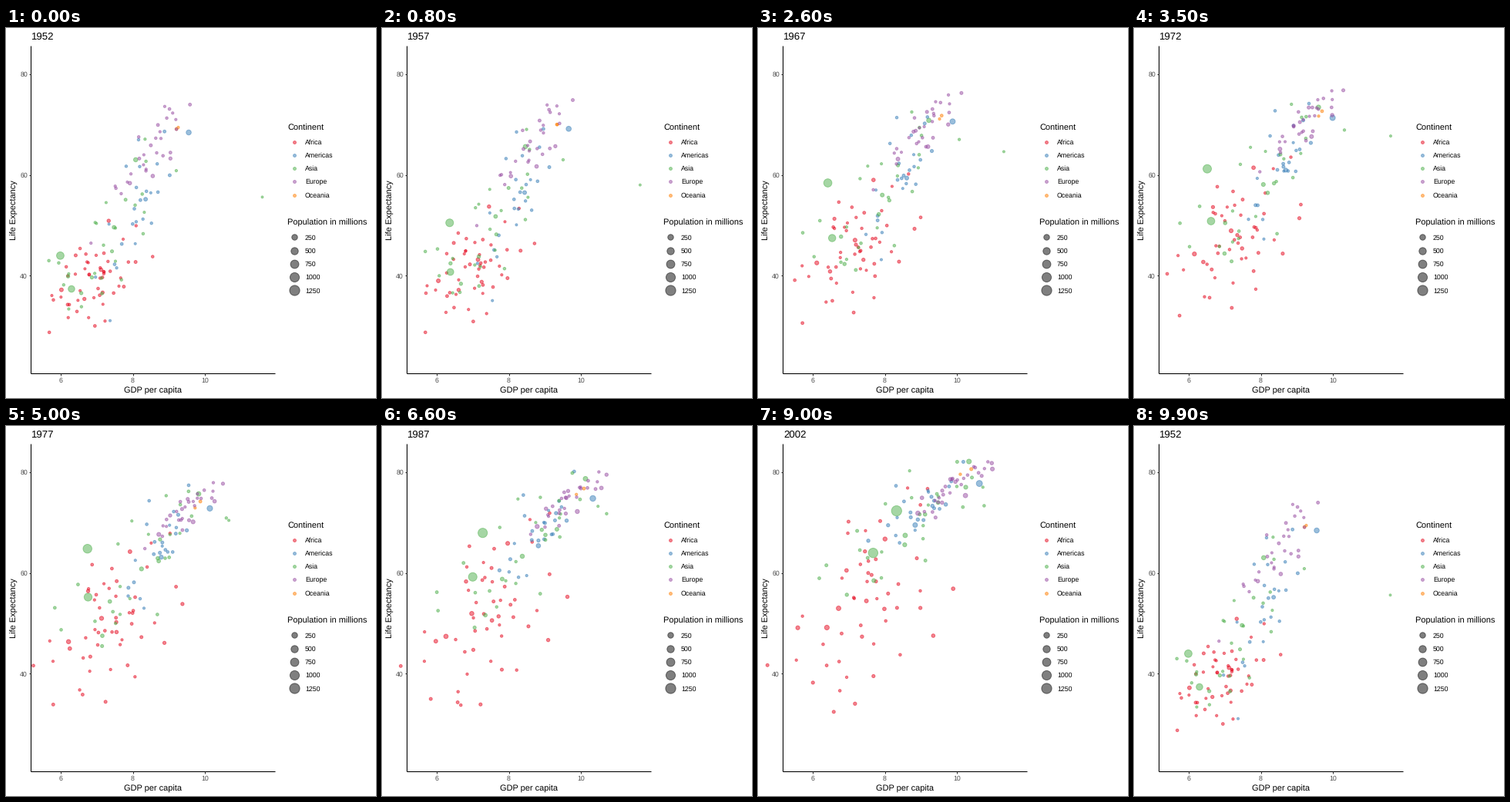
These frames come from a looping animation (480x480 px, 10 s). A matplotlib script:

```python
import numpy as np
import matplotlib.pyplot as plt
from matplotlib.animation import FuncAnimation
from matplotlib.colors import to_rgba

plt.rcParams["font.family"] = "Liberation Sans"
plt.rcParams["text.hinting"] = "none"

SIZE, DPI = 480, 96
PT = 72 / DPI                       # points per pixel
LEFT, RIGHT, TOP, BOTTOM = 32.4, 349.2, 23.2, 448.2
YEARS = np.arange(1952, 2008, 5)
SWITCHES = (7, 16, 25, 34, 43, 50, 58, 66, 74, 82, 90, 98)
MAX_POP = 1318

COLORS = {"Africa": "#E60A20", "Americas": "#377EB8", "Asia": "#4DAF4A",
          "Europe": "#984EA3", "Oceania": "#FF7F00"}

# Each cloud: number of countries, correlation of wealth and life, and
# mean and spread of log GDP, then of life, in 1952, 1977 and 2007
CLOUDS = {
    "Africa": (51, 0.45, (6.93, 7.37, 7.48), (0.62, 0.80, 0.95),
               (39.1, 49.6, 54.8), (4.8, 6.6, 9.2)),
    "Americas": (24, 0.75, (8.10, 8.70, 9.00), (0.50, 0.45, 0.60),
                 (53.0, 64.3, 73.5), (9.0, 6.8, 4.2)),
    "Asia": (29, 0.75, (7.25, 8.10, 8.75), (0.85, 1.10, 1.20),
             (46.5, 59.8, 70.5), (8.6, 8.8, 6.8)),
    "Europe": (30, 0.88, (8.48, 9.45, 10.0), (0.60, 0.50, 0.58),
               (64.4, 71.9, 77.6), (6.2, 3.0, 2.8)),
}

# Countries that stand apart: continent, population in 1952 and 2007,
# then a path of (year, log GDP, life)
PATHS = [
    ("Oceania", 9, 20, (1952, 9.21, 69.1), (1977, 9.82, 73.5), (2007, 10.45, 81.2)),
    ("Oceania", 2, 4, (1952, 9.26, 69.4), (1977, 9.69, 72.2), (2007, 10.13, 80.2)),
    ("Africa", 3, 9, (1952, 6.20, 40.0), (1987, 6.74, 44.0), (1992, 6.60, 23.6),
     (2007, 6.76, 46.2)),
    ("Americas", 158, 301, (1952, 9.55, 68.4), (1972, 9.99, 71.3), (2007, 10.67, 78.2)),
    ("Asia", 86, 127, (1952, 8.08, 63.0), (1972, 9.60, 73.4), (1992, 10.20, 79.4),
     (2007, 10.36, 82.6)),
    ("Asia", 0.2, 2.5, (1952, 11.59, 55.6), (1957, 11.64, 58.0), (1967, 11.30, 64.6),
     (1972, 11.60, 67.7), (1982, 10.35, 71.3), (2007, 10.76, 77.6)),
    ("Asia", 372, 1110, (1952, 6.30, 37.4), (1977, 6.70, 54.2), (1992, 7.06, 60.2),
     (2007, 7.80, 64.7)),
    ("Asia", 556, 1318, (1952, 5.99, 44.0), (1957, 6.36, 50.5), (1962, 6.19, 44.5),
     (1967, 6.42, 58.4), (1977, 6.61, 64.0), (1992, 7.41, 68.7), (2007, 8.51, 73.0)),
]


def standard(rng, n):
    """n draws scaled to mean 0 and deviation 1, without far outliers."""
    z = np.clip(rng.standard_normal(n), -2, 2)
    return (z - z.mean()) / z.std()


def cloud(rng, n, corr, *moments):
    """Positions and populations, one row per year; ranks wander slowly."""
    mx, sx, my, sy = (np.interp(YEARS, (1952, 1977, 2007), m)[:, None] for m in moments)
    turn = 0.9 * (YEARS[:, None] - 1952) / 55

    def wander():
        return standard(rng, n) * np.cos(turn) + standard(rng, n) * np.sin(turn)

    zx = wander()
    zy = corr * zx + np.sqrt(1 - corr ** 2) * wander()
    life = np.clip(my + sy * zy, 28.8, 82)
    pop = 5 * np.exp(standard(rng, n)) * 1.018 ** (YEARS[:, None] - 1952)
    return np.stack([mx + sx * zx, life], axis=2), pop


def path(p0, p1, keys):
    t, x, y = np.transpose(keys)
    pos = np.column_stack([np.interp(YEARS, t, x), np.interp(YEARS, t, y)])
    return pos[:, None], np.geomspace(p0, p1, len(YEARS))[:, None]


rng = np.random.default_rng(7)
groups = [(name, path(p0, p1, keys)) for name, p0, p1, *keys in PATHS]
groups += [(name, cloud(rng, *spec)) for name, spec in CLOUDS.items()]
POS = np.concatenate([g[1][0] for g in groups], axis=1)
POP = np.concatenate([g[1][1] for g in groups], axis=1)
FILLS = [to_rgba(COLORS[name], 0.5) for name, (pos, _) in groups for _ in pos[0]]


def px(gdp):
    return LEFT + (gdp - 5.177) * (RIGHT - LEFT) / 6.770


def py(life):
    return BOTTOM - (life - 20.649) * (BOTTOM - TOP) / 64.904


def area(size):
    """Marker area for a plotting size."""
    return (0.75 * (size * 2.845 + 0.945) * PT) ** 2


def pop_area(pop):
    return area(1 + 5 * np.sqrt(pop / MAX_POP))


fig = plt.figure(figsize=(SIZE / DPI, SIZE / DPI), dpi=DPI, facecolor="white")
ax = fig.add_axes([0, 0, 1, 1])
ax.set(xlim=(0, SIZE), ylim=(SIZE, 0))
ax.axis("off")


def text(x, y, s, size, color="black", **kw):
    return ax.text(x, y, s, size=size * PT, color=color, va="baseline", **kw)


def line(xs, ys, color="black"):
    ax.plot(xs, ys, color=color, lw=1.07 * PT, solid_capstyle="butt")


def dots(x, y, sizes, colors):
    return ax.scatter(x, y, s=sizes, facecolors=colors, edgecolors=colors,
                      linewidths=0.95 * PT)


points = dots(px(POS[0, :, 0]), py(POS[0, :, 1]), pop_area(POP[0]), FILLS)

line([LEFT, LEFT], [TOP, BOTTOM])
line([LEFT, RIGHT], [BOTTOM, BOTTOM])
for v in (6, 8, 10):
    line([px(v)] * 2, [BOTTOM, BOTTOM + 2.75], "#333333")
    text(px(v), 460, str(v), 8.8, "#4D4D4D", ha="center")
for v in (40, 60, 80):
    line([LEFT - 2.75, LEFT], [py(v)] * 2, "#333333")
    text(28, py(v) + 3.1, str(v), 8.8, "#4D4D4D", ha="right")
text((LEFT + RIGHT) / 2, 473.3, "GDP per capita", 11, ha="center")
text(14, (TOP + BOTTOM) / 2, "Life Expectancy", 11, ha="center",
     rotation=90, rotation_mode="anchor")
title = text(33, 15, "1952", 13.2)


def legend(y, heading, entries):
    """A heading with one dot and label per (label, area, colour)."""
    text(365.1, y, heading, 11)
    for i, (label, size, color) in enumerate(entries):
        row = y + 15.1 + 17.28 * i
        dots([374.1], [row], size, [to_rgba(color, 0.5)])
        text(388, row + 3.2, label, 8.8)


legend(132.4, "Continent", [(n, area(1.5), c) for n, c in COLORS.items()])
legend(256.2, "Population in millions",
       [(str(p), pop_area(p), "black") for p in (250, 500, 750, 1000, 1250)])


def update(frame):
    # each switch takes one halfway frame, then the next year holds
    state = sum(0.5 * (frame >= c) + 0.5 * (frame > c) for c in SWITCHES)
    i, part = int(state) % 12, state % 1
    j = (i + 1) % 12
    pos = POS[i] + (POS[j] - POS[i]) * part
    pop = POP[i] + (POP[j] - POP[i]) * part
    points.set_offsets(np.column_stack([px(pos[:, 0]), py(pos[:, 1])]))
    points.set_sizes(pop_area(pop))
    title.set_text(str(YEARS[i]))
    return points, title


anim = FuncAnimation(fig, update, frames=100, interval=100, repeat=True, repeat_delay=0)
plt.show()
```
